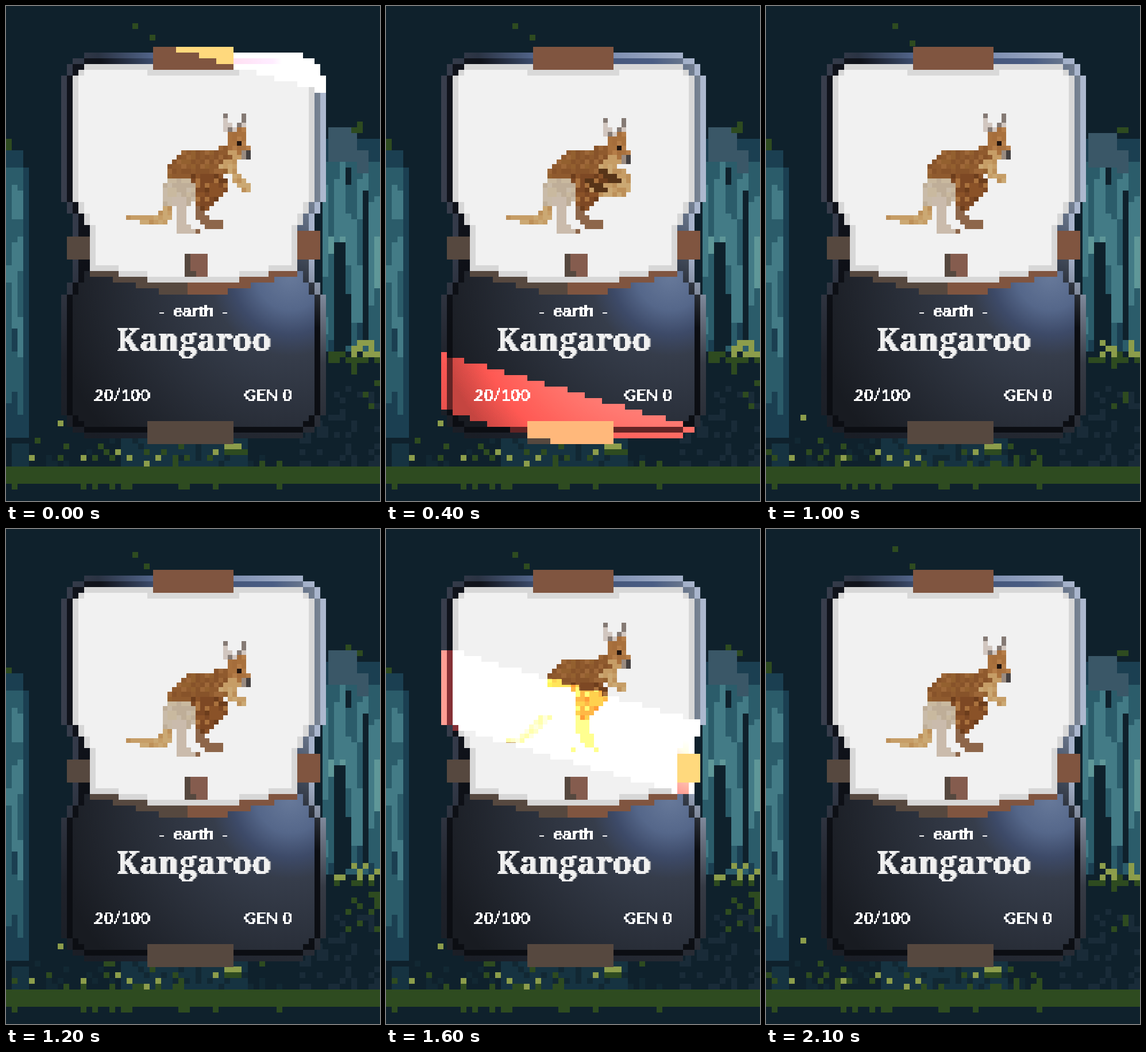
Recreate the animation shown at these times as an HTML page with a canvas. Size 651 by 861 pixels, loop 2300 ms.

```html
<!DOCTYPE html>
<html lang="en">
<head>
<meta charset="utf-8">
<title>Kangaroo card</title>
<style>
  html, body { margin: 0; width: 100%; height: 100%; overflow: hidden; background: #0f212c; }
  canvas { display: block; }
</style>
</head>
<body>
<canvas id="stage" width="651" height="861"></canvas>
<script>
const LOOP = 2300, STEP = 100;
const ctx = document.getElementById('stage').getContext('2d');
const clamp = (v, lo, hi) => Math.max(lo, Math.min(hi, v));

// Pseudo-random value in 0..1 for a cell.
const hash = (x, y) => {
  const v = Math.sin(x * 127.1 + y * 311.7) * 43758.5453;
  return v - Math.floor(v);
};
const pick = (list, x, y) => list[Math.floor(hash(x, y) * list.length)];

// A painter fills blocks given in cells of its own grid.
function grid(ox, oy, size) {
  const toPixels = ([x, y, w = 1, h = 1]) => {
    const l = Math.round(ox + x * size), t = Math.round(oy + y * size);
    return [l, t, Math.round(ox + (x + w) * size) - l, Math.round(oy + (y + h) * size) - t];
  };
  const paint = (color, ...blocks) => {
    ctx.fillStyle = color;
    for (const b of blocks) ctx.fillRect(...toPixels(b));
  };
  paint.toPixels = toPixels;
  return paint;
}
const forest = grid(0, .4, 10.012);
const card = grid(5.6, .5, 10.02);
const roo = grid(209, 187, 8.04);

/* ---------- forest ---------- */

const night = '#0f212c', moss = '#2e4b20', lime = '#8c9d4b', slate = '#3a5767';
const tones = ['#1b3f51', '#2b5c6a', '#437b86', '#5f9798'];

function scatter(color, [x0, y0, w, h], density, seed = 0) {
  for (let y = y0; y < y0 + h; y++)
    for (let x = x0; x < x0 + w; x++)
      if (hash(x + seed, y) < density) forest(color, [x, y]);
}

// Hanging streaks of misty light, brightest around the middle height.
function streaks(x0, x1, top, bottom) {
  for (let x = x0; x < x1; x++)
    for (let y = top, length; y < bottom; y += length) {
      length = Math.min(bottom - y, 3 + Math.floor(hash(x, y) * 8));
      const light = 1.9 - Math.abs(y - 40) / 14 + hash(y, x) * 1.4;
      forest(tones[clamp(Math.floor(light), 0, 3)], [x, y, 1, length]);
    }
}

// sway 0 and 2 are the two extremes, 1 is the middle.
function drawForest(sway) {
  const seed = 17 * sway;
  forest(night, [0, 0, 66, 87]);

  streaks(0, 3, 28, 75);
  forest(tones[0], [0, 25, 3, 3], [3, 28, 1, 47]);
  forest(moss, [0, 23 + (sway === 2), 1, 2 - (sway === 2)]);

  streaks(55, 65, 27, 60);
  forest(tones[0], [55, 23, 10, 4]);
  forest(slate, [56, sway === 1 ? 22 : 21, 5, 6], [61, 25, 2, 4]);
  forest(night, [57, 41, 2, 19], [59, 28, 1, 3], [59, 50, 1, 9], [62, 32, 1, 26]);
  scatter(moss, [56, 20 + (sway === 1), 7, 2], .25, seed);

  forest(night, [55, 60, 10, 20]);
  scatter('#192b38', [51, 66, 14, 14], .24);
  scatter(moss, [56, 60, 9, 2], .6, seed);
  scatter(moss, [59, 62, 6, 8], sway === 2 ? .3 : .1, seed);
  scatter(lime, [57, 58, 8, 3], .35, seed);

  forest('#163341', [20, 75, 22, 5], [1, 76, 3, 4]);
  scatter(tones[0], [20, 74, 30, 5], .1);
  scatter('#122833', [5, 75, 45, 5], .2);
  scatter(moss, [0, 75, 48, 5], .1, seed);
  scatter(lime, [0, 76, 48, 4], .03, 5);
  forest(moss, [38, 76, 3, 2]);
  forest(lime, [38, 76, 3, 1], [sway === 1 ? 6 : 9, sway === 1 ? 71 : 72]);

  forest(moss, [0, 80, 66, 3], [22, sway === 2 ? 4 : 3], [sway === 2 ? 24 : 25, sway === 0 ? 5 : 6]);
  scatter(moss, [0, 83, 65, 1], .18);
}

/* ---------- card ---------- */

// A profile gives the side margin of each row; the card is symmetric.
const corner = d => Math.floor(4 / (d + 1));
const waist = y => clamp(Math.floor(1 + (7.5 - Math.abs(y - 41.5)) / 2), 0, 2);
const shrink = p => y => Math.max(p(y - 1), p(y) + 1, p(y + 1));

const rimProfile = y => 9 + corner(Math.max(0, y - 8)) + corner(Math.max(0, 74 - y)) + waist(y);
const grooveProfile = shrink(rimProfile);
const plateProfile = shrink(grooveProfile);
const panelProfile = y => Math.max(plateProfile(y), y > 37 ? 14 : 0, 14 + 5 * (y - 45));

function rows(profile, from, to, extras = []) {
  const path = new Path2D();
  for (let y = from; y < to; y++)
    path.rect(...card.toPixels([profile(y), y, 64 - 2 * profile(y), 1]));
  for (const block of extras) path.rect(...card.toPixels(block));
  return path;
}

const topBracket = [25, 7, 14, 4], leftBracket = [10, 40, 4, 4],
      rightBracket = [50, 39, 4, 5], bottomBracket = [24, 72, 15, 4];
const rim = rows(rimProfile, 8, 75);
const outline = rows(rimProfile, 8, 75, [topBracket, leftBracket, rightBracket, bottomBracket]);
const groove = rows(grooveProfile, 9, 74);
const plate = rows(plateProfile, 46, 73);
const panelEdge = rows(panelProfile, 10, 48);
const panel = rows(shrink(panelProfile), 11, 47);
const trim = rows(y => 14 + 4 * (y - 46), 46, 50);

function fade(gradient, stops) {
  for (const [at, color] of stops) gradient.addColorStop(at, color);
  return gradient;
}
const across = (...stops) => fade(ctx.createLinearGradient(96, 0, 557, 0), stops);
const down = (y0, y1, ...stops) => fade(ctx.createLinearGradient(0, y0, 0, y1), stops);

const dark = '#56483f', brown = '#805540';
const rimTint = across([0, '#3a3f4d'], [.14, '#2a3343'], [.35, '#52658b'], [.65, '#7f90b2'], [1, '#aebad0']);
const grooveTint = across([0, '#10131b'], [.15, '#10131b'], [.35, '#3d4d6d'], [.8, '#4a5d84'], [1, '#7e8893']);
const trimTint = across([.478, dark], [.478, brown]);
const dusk = down(430, 750, [0, 'rgba(24,27,34,0)'], [.6, 'rgba(24,27,34,.8)'], [1, 'rgba(24,27,34,.9)']);
const grooveDusk = down(350, 560, [0, 'rgba(12,14,19,0)'], [1, 'rgba(12,14,19,1)']);
const plateTint = fade(ctx.createRadialGradient(495, 470, 0, 495, 470, 420),
  [[0, '#67799a'], [.14, '#55678a'], [.24, '#3d4a68'], [.33, '#363d4b'], [.65, '#282d37'], [1, '#181b21']]);

function fill(path, ...styles) {
  for (const style of styles) {
    ctx.fillStyle = style;
    ctx.fill(path);
  }
}

function drawCard() {
  fill(rim, rimTint, dusk);
  fill(groove, grooveTint, grooveDusk);
  fill(plate, plateTint);
  fill(trim, trimTint);
  fill(panelEdge, '#d7d7d7');
  fill(panel, '#f1f1f1');
  card('#d9d9d9', [24, 11, 16, 1]);
  card(dark, [30.5, 43, 4, 4], leftBracket, bottomBracket);
  card('#855c4e', [31.5, 43, 3, 3], [32.5, 46, 2, 1]);
  card(brown, topBracket, rightBracket);
}

/* ---------- text ---------- */

// Text rasterised coarsely so that it gets hard square pixels.
function pixelText(text, font, size, color, wordSpacing = 0) {
  const dot = 2.5, c = document.createElement('canvas');
  c.width = 160;
  c.height = 32;
  const g = c.getContext('2d');
  g.font = `bold ${size / dot}px ${font}`;
  g.wordSpacing = `${wordSpacing / dot}px`;
  g.fillStyle = color;
  g.fillText(text, 2, 24);
  const width = g.measureText(text).width * dot;
  const image = g.getImageData(0, 0, c.width, c.height);
  for (let i = 3; i < image.data.length; i += 4) image.data[i] = image.data[i] > 105 ? 255 : 0;
  g.putImageData(image, 0, 0);
  return (x, baseline, align = 0) =>
    ctx.drawImage(c, Math.round(x - align * width - 2 * dot), baseline - 24 * dot, c.width * dot, c.height * dot);
}
const sans = '"Liberation Sans", Arial, sans-serif', narrow = 'Lato, sans-serif', serif = '"Noto Serif", serif';
const element = pixelText('- earth -', sans, 29, '#fff', 6);
const title = pixelText('Kangaroo', serif, 55, '#f0f0f0');
const titleShade = pixelText('Kangaroo', serif, 55, '#a2a4a8');
const serial = pixelText('20/100', narrow, 29, '#fff');
const generation = pixelText('GEN 0', narrow, 29, '#fff');

function drawText() {
  element(326, 540, .5);
  titleShade(328, 600, .5);
  title(325.5, 600, .5);
  serial(153, 687);
  generation(498, 687, 1);
}

/* ---------- kangaroo ---------- */

const fur = {
  back: ['#8f5a2e', '#93602f', '#87532a', '#9d6738'],
  belly: ['#a9713d', '#8a5228', '#7d4824', '#6c3d1c'],
  head: ['#a9713d', '#a56d3b', '#b57d48'],
  tan: ['#c69d66', '#bd9059', '#cba873'],
  cream: ['#c9b99f', '#c9bba8', '#bfae98'],
  shin: ['#cabbac'],
  hind: ['#8d664a'],
  stripe: ['#573418']
};

const outlines = {
  tail: 'M0 22H7V21H8V20H10V23H9V24H3V23H0z',
  tailAir: 'M0 25H3L8 20H10L9 22L4 25.6L3 26H0z',
  hind: 'M15 20H17V22H18V23H21V25H17V24H16V23H15z',
  hindAir: 'M15 20H17L19 25V27H20V28H19V27H17L15 23z',
  shin: 'M10 18H13V24H14V25H15V26H11V20H10z',
  shinAir: 'M10 18H13V26H14V27H12V26H11V20H10z',
  back: 'M20 7H22L23 9V13L15 15H9V12L11 9L13 8H20z',
  backLow: 'M19 7H22L23 9V13L15 15H9V13L12 9L14 8H19z',
  belly: 'M14 13H21L22 15V17L20 18L19 20L17 21H16L15 19z',
  chest: 'M20 11L22 10H24V12H20z',
  thigh: 'M9 14H13L15 16V18L13 20H8V16z',
  head: 'M22 4H24V3H26V7H27V8H26V10H23V9H22z',
  ears: 'M21 1H22V2H23V4H21zM25 2H26V3H24V4H23V3H24V2z',
  reach: 'M21 11H23L24 13L27 15V17H25L23 14z',
  rest: 'M22 12H24V13H26V15H24V14H22z',
  fold: 'M20 12H25L27 14V16L25 18H22L18 17V16L22 15z',
  stripes: 'M19 12H21L25 14V15H23zM16 14H18L22 16V17H20z'
};

// Cells whose centre lies inside each outline.
const cells = {};
for (const [name, d] of Object.entries(outlines)) {
  const path = new Path2D(d);
  cells[name] = [];
  for (let y = 0; y < 28; y++)
    for (let x = 0; x < 27; x++)
      if (ctx.isPointInPath(path, x + .5, y + .5)) cells[name].push([x, y]);
}

const poses = [
  { from: 0, arm: 'reach' },
  { from: 200, low: true, arm: 'reach' },
  { from: 400, low: true, arm: 'fold' },
  { from: 800, low: true, arm: 'rest' },
  { from: 1000, arm: 'rest' },
  { from: 1200, low: true, arm: 'rest' },
  { from: 1400, air: true, arm: 'rest' },
  { from: 1900, low: true, arm: 'rest' },
  { from: 2100, arm: 'rest' }
];

function drawKangaroo(t) {
  const { low, air, arm } = poses.findLast(p => p.from <= t);
  const lift = air ? -3 : 0, nod = lift + (low ? 1 : 0), suffix = air ? 'Air' : '';
  const part = (name, shades, dy = lift) => {
    for (const [x, y] of cells[name]) roo(pick(shades, x, y), [x, y + dy]);
  };
  const dots = (color, ...blocks) => roo(color, ...blocks.map(([x, y, w, h]) => [x, y + nod, w, h]));

  part('tail' + suffix, fur.tan);
  part('hind' + suffix, fur.hind);
  part('back' + (low ? 'Low' : ''), fur.back);
  part('belly', fur.belly);
  part('chest', fur.tan);
  part('thigh', fur.cream);
  part('shin' + suffix, fur.shin);
  roo(fur.hind[0], air ? [14, 24] : [15, 25]);

  part('ears', ['#d1c6bf'], nod);
  part('head', fur.head, nod);
  dots('#857a74', [21, 0], [25, 0, 1, 2], [22, 3], [24, 2]);
  dots(fur.tan[0], [22, 8, 2, 1], [23, 9, 2, 1]);
  dots('#9a8b80', [25, 8, 1, 2]);
  dots('#454141', [26, 8, 1, 2]);
  dots('#21150f', [24, 6]);

  part(arm, fur.tan);
  if (arm === 'fold') part('stripes', fur.stripe);
}

/* ---------- shine ---------- */

// Slanted shine running down the card, speeding up on its way.
function drawShine(age) {
  if (age >= 500) return;
  const u = age / 100, bottom = 18 + 151 * u + 5 * u * u, thickness = 170 - 18 * u;
  ctx.save();
  ctx.clip(outline);
  ctx.globalCompositeOperation = 'color-dodge';
  for (let x = 9; x < 55; x++) {
    const end = bottom + 2.9 * (x - 9);
    const top = Math.round((end - thickness) / 10);
    card('rgb(224,155,124)', [x, top, 1, Math.round(end / 10) - top]);
  }
  ctx.restore();
}

const swayAt = t => t < 600 ? 0 : t < 1200 ? 1 : t < 1900 ? 2 : 1;

function frame() {
  const t = Math.floor(performance.now() % LOOP / STEP) * STEP;
  ctx.imageSmoothingEnabled = false;
  drawForest(swayAt(t));
  drawCard();
  drawKangaroo(t);
  drawText();
  drawShine(t % 1400);
  requestAnimationFrame(frame);
}
frame();
</script>
</body>
</html>
```
